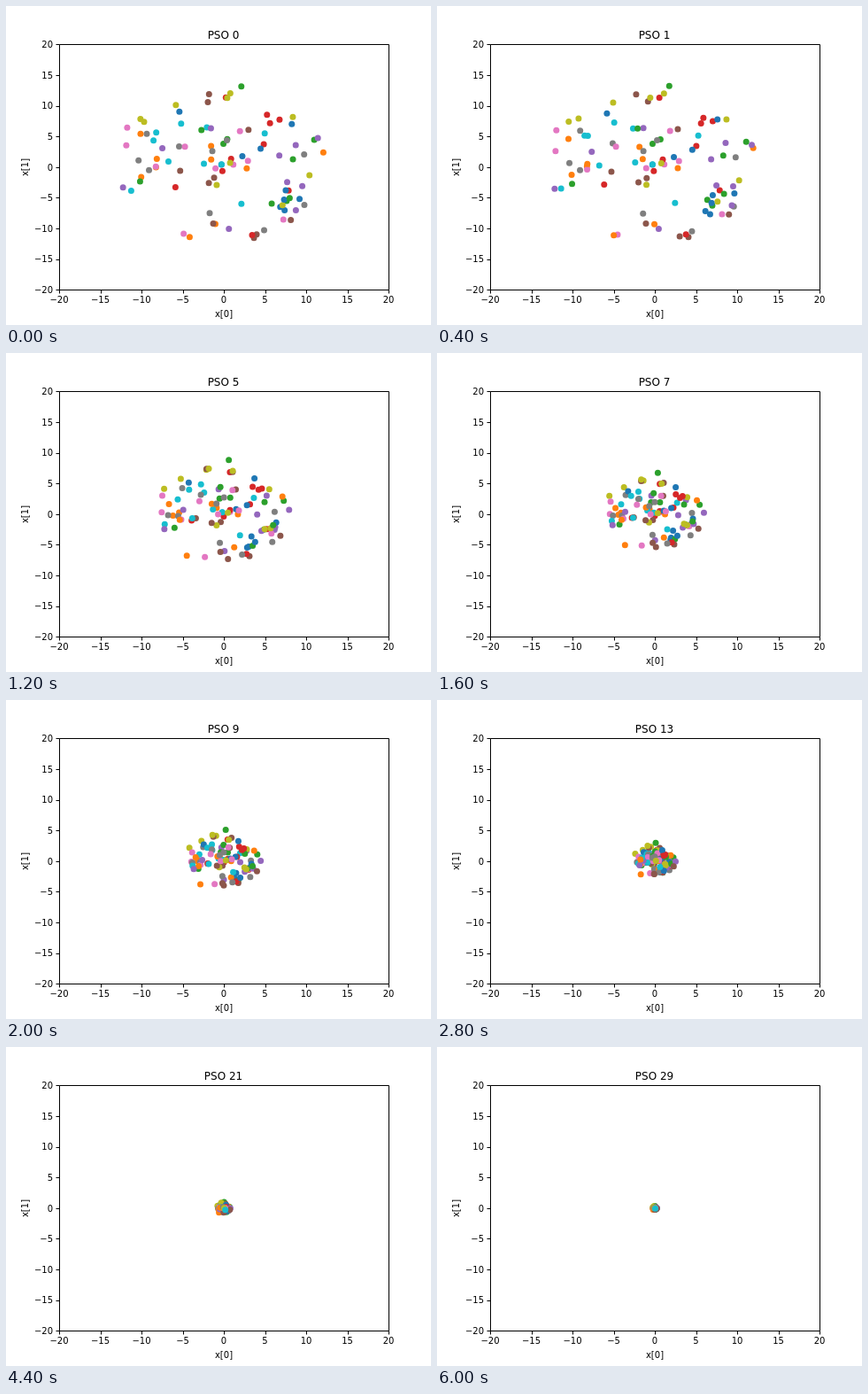
These frames come from a looping animation (480x360 px, 6.2 s). An HTML page:

```html
<!DOCTYPE html>
<html lang="en">
<meta charset="utf-8">
<title>Particle swarm</title>
<style>
  html, body { margin: 0; width: 100%; height: 100%; overflow: hidden; background: #fff; }
  svg { display: block; }
  text { font: 10px "DejaVu Sans", sans-serif; text-anchor: middle; }
  #title { font-size: 12px; }
  .ylab { text-anchor: end; }
  path { fill: none; stroke: #000; }
</style>
<svg id="plot" width="480" height="360" viewBox="0 0 480 360">
  <g id="dots"></g>
  <path d="M60.5 43.5H432.5V320.5H60.5Z"/>
  <text id="title" x="245.5" y="37"></text>
  <text x="246" y="351">x[0]</text>
  <text transform="translate(25 182) rotate(-90)">x[1]</text>
</svg>
<script>
const plot = document.getElementById('plot');
const dots = document.getElementById('dots');
const title = document.getElementById('title');
const colours = ['#1f77b4', '#ff7f0e', '#2ca02c', '#d62728', '#9467bd',
  '#8c564b', '#e377c2', '#7f7f7f', '#bcbd22', '#17becf'];

const px = x => 246 + 9.3 * x;
const py = y => 181.8 - 6.93 * y;
const snap = v => Math.round(v) + .5;

function add(parent, tag, attrs, text = '') {
  const el = document.createElementNS('http://www.w3.org/2000/svg', tag);
  for (const k in attrs) el.setAttribute(k, attrs[k]);
  el.textContent = text;
  return parent.appendChild(el);
}

for (let v = -20; v <= 20; v += 5) {
  const label = String(v).replace('-', '\u2212');
  add(plot, 'path', { d: `M${snap(px(v))} 320.5v4M60.5 ${snap(py(v))}h-4` });
  add(plot, 'text', { x: px(v), y: 335 }, label);
  add(plot, 'text', { x: 53, y: Math.round(py(v) + 3.7), class: 'ylab' }, label);
}

let seed = 7;
const rand = () => (seed = seed * 16807 % 2147483647) / 2147483647;

// Particles fill a disc, denser in the middle; each has its own turn and rate
const swarm = Array.from({ length: 100 }, (_, i) => ({
  radius: 13 * rand() ** .85,
  angle: 2 * Math.PI * rand(),
  turn: rand() - .5,
  rate: .13 + .05 * rand(),
  el: add(dots, 'circle', { r: 3.5, fill: colours[i % 10] })
}));

function draw(step) {
  title.textContent = 'PSO ' + step;
  const settled = 1 - Math.exp(-step / 4);
  for (const p of swarm) {
    const scale = Math.exp(-p.rate * Math.max(0, step - 2));
    const angle = p.angle + p.turn * settled;
    p.el.setAttribute('cx', px(scale * (p.radius * Math.cos(angle) - .3)));
    p.el.setAttribute('cy', py(scale * (p.radius * Math.sin(angle) + .4)));
  }
}

// The first step lasts twice as long as the others
let shown = -1;
function tick() {
  const step = Math.max(0, Math.floor(performance.now() % 6200 / 200) - 1);
  if (step !== shown) draw(shown = step);
  requestAnimationFrame(tick);
}
tick();
</script>
</html>
```
